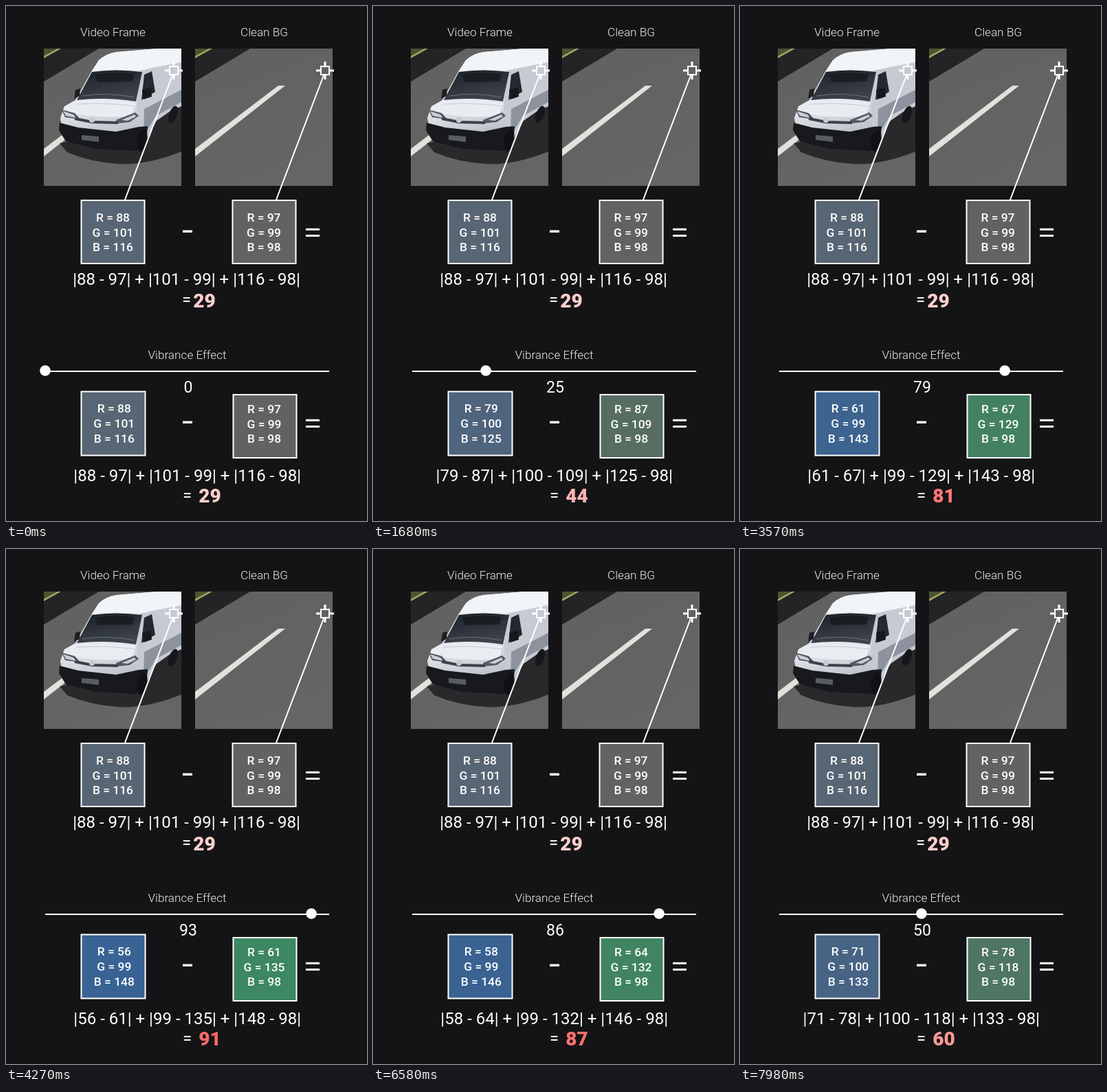
An HTML page that plays this animation: 525 px wide and 750 px high, repeating every 8 s.

```html
<!DOCTYPE html>
<html lang="en">
<head>
<meta charset="utf-8">
<title>Vibrance Effect</title>
<style>
  html, body { margin: 0; width: 100%; height: 100%; overflow: hidden; background: #141416; }
  svg { display: block; width: 525px; height: 750px; }
  text { font-family: Roboto, "Open Sans", sans-serif; fill: #fff; text-anchor: middle; white-space: pre; }
  .title { font-size: 17.2px; font-weight: 300; fill: #eee; }
  .rgb { font-size: 17.4px; font-weight: 500; }
  .sum { font-size: 24px; }
  .value { font-size: 23px; }
  .total { font-size: 28px; font-weight: 800; fill: #ffcfcb; }
  .ink { stroke: #fff; stroke-width: 2; fill: none; }
  .box { stroke: #fff; stroke-width: 2; }
</style>
</head>
<body>
<svg viewBox="0 0 525 750">
  <defs>
    <clipPath id="photo"><rect width="200" height="200"/></clipPath>
    <linearGradient id="asphalt" x2=".4" y2="1">
      <stop offset="0" stop-color="#626161"/><stop offset="1" stop-color="#666565"/>
    </linearGradient>
    <linearGradient id="paint" x2=".3" y2="1">
      <stop offset="0" stop-color="#f5f7fa"/><stop offset=".6" stop-color="#e4e8ed"/><stop offset="1" stop-color="#b5bbc4"/>
    </linearGradient>
    <linearGradient id="glass" x2=".4" y2="1">
      <stop offset="0" stop-color="#1b2027"/><stop offset="1" stop-color="#3d434b"/>
    </linearGradient>
    <g id="road">
      <rect width="200" height="200" fill="url(#asphalt)"/>
      <path d="M0 0H80L0 48Z" fill="#232425"/>
      <path d="M0 0H23L0 13Z" fill="#4c5430"/>
      <path d="M0 11 20 0H25L0 14Z" fill="#aaa467"/>
      <path d="M0 146 121 54H131L0 157Z" fill="#e2e1dc"/>
    </g>
    <g id="target" class="ink">
      <rect x="-6" y="-6" width="12" height="12"/>
      <path d="M-13 0H-6M6 0H13M0-13V-6M0 6V13" stroke-width="3"/>
      <path d="M-2 7-71 188"/>
    </g>
  </defs>
  <rect width="525" height="750" fill="#141416"/>

  <g transform="translate(55 62)" clip-path="url(#photo)">
    <use href="#road"/>
    <!-- shadow and underside -->
    <path d="M23 138 34 151Q70 166 110 168T200 150V75L150 110Z" fill="#29292b"/>
    <!-- body -->
    <path d="M70 32 80 17Q91 7 106 5L165 0H200V78L187 88 165 100 150 132 134 140 28 124 24 101 30 84 46 75Z" fill="url(#paint)"/>
    <path d="M140 32 158 28 185 23 200 20V84L184 91 164 105 150 128 138 120 135 84Z" fill="#c6cbd3"/>
    <path d="M146 88 200 60V78L163 98 145 128Z" fill="#8d939e"/>
    <path d="M80 17Q91 7 106 5L165 0H200V18L145 31 72 30Z" fill="#f2f5f8"/>
    <!-- glass -->
    <path d="M70 34Q105 29 143 34L134 77Q90 70 48 75Z" fill="url(#glass)"/>
    <path d="M75 38Q104 33 132 37L129 48 78 49Z" fill="#14181d" opacity=".75"/>
    <path d="M56 69Q91 63 132 71" stroke="#6a7178" fill="none"/>
    <path d="M146 38 157 33 162 63 142 75Z" fill="#24292f"/>
    <path d="M143 60 156 57 157 70 145 74Z" fill="#16191c"/>
    <path d="M46 60 53 58 52 69 44 73Z" fill="#1c2024"/>
    <!-- bonnet -->
    <path d="M47 77Q91 72 134 79L128 98Q80 103 27 92L31 84Z" fill="#e9edf1"/>
    <path d="M47 81Q91 78 133 84" stroke="#c3cad2" fill="none"/>
    <!-- bumper, grille, lights -->
    <path d="M23 108 50 115 105 121 138 114 151 113 149 139 134 149 75 146 32 135 22 119Z" fill="#17191d"/>
    <path d="M26 89 45 94 53 103 31 100Z" fill="#4d545e"/>
    <path d="M28 91 43 96 47 101 32 98Z" fill="#c6ced7"/>
    <path d="M105 104 133 93 138 98 125 107 106 109Z" fill="#535a64"/>
    <path d="M113 104 132 96 134 99 122 105Z" fill="#c7ced7"/>
    <path d="M45 102 70 107 108 108" stroke="#3c4148" stroke-width="4" fill="none"/>
    <circle cx="70" cy="104" r="4" fill="#c5cbd2"/>
    <path d="M55 126 80 128V136L55 133Z" fill="#595d62"/>
    <!-- wheels -->
    <ellipse cx="143" cy="134" rx="7" ry="16" transform="rotate(12 143 134)" fill="#101114"/>
    <ellipse cx="188" cy="96" rx="6" ry="13" transform="rotate(20 188 96)" fill="#15171a"/>
  </g>
  <use href="#road" transform="translate(275 62)" clip-path="url(#photo)"/>
  <g id="stage"></g>
</svg>
<script>
const STEP = 70, LOOP = 8000;
const stage = document.getElementById('stage');

function add(tag, attrs, text = '') {
  const el = document.createElementNS('http://www.w3.org/2000/svg', tag);
  for (const key in attrs) el.setAttribute(key, attrs[key]);
  el.textContent = text;
  return stage.appendChild(el);
}
const label = (cls, x, y, text) => add('text', { class: cls, x, y }, text);
const rgb = c => `rgb(${c.join(',')})`;
const mix = (a, b, p) => a.map((v, i) => Math.round(v + (b[i] - v) * p));

// Bordered swatch with three channel lines
function swatch(x, y, textX, textY, size = 92) {
  const box = add('rect', { class: 'box', x, y, width: size, height: size });
  const lines = [0, 1, 2].map(i => label('rgb', textX, textY + i * 21.7));
  return color => {
    box.setAttribute('fill', rgb(color));
    lines.forEach((line, i) => line.textContent = `${'RGB'[i]} = ${color[i]}`);
  };
}

// Sum of absolute channel differences
function difference(x, y, totalX, totalY) {
  const sum = label('sum', x, y);
  const total = label('total', totalX, totalY);
  return (a, b, color) => {
    sum.textContent = a.map((v, i) => `|${v} - ${b[i]}|`).join(' + ');
    total.textContent = a.reduce((s, v, i) => s + Math.abs(v - b[i]), 0);
    total.style.fill = rgb(color);
  };
}

function operators(y) {
  add('rect', { x: 257, y: y - 1.5, width: 14, height: 3.4, fill: '#fff' });
  for (const dy of [-4.2, 5])
    add('rect', { x: 436, y: y + dy, width: 20, height: 3, fill: '#fff' });
}

const PALE = [255, 207, 203], RED = [255, 98, 98];
const FRAME = [88, 101, 116], CLEAN = [97, 99, 98];

label('title', 155.5, 44, 'Video Frame');
label('title', 375.5, 44, 'Clean BG');
label('title', 263.5, 514, 'Vibrance Effect');
for (const x of [244, 464]) add('use', { href: '#target', x, y: 94 });

swatch(109.5, 283, 155.5, 313.8)(FRAME);
swatch(329.5, 283, 375, 313.8)(CLEAN);
operators(328);
difference(262.5, 406, 288.5, 439)(FRAME, CLEAN, PALE);
label('sum', 262.5, 436, '=');

add('path', { class: 'ink', d: 'M57 532H470' });
const knob = add('circle', { cy: 531, r: 7.8, fill: '#fff' });
const value = label('value', 265, 563);
const left = swatch(109.5, 561.5, 157.3, 592.3, 93);
const right = swatch(330.5, 566, 375.5, 592.8);
operators(606);
const result = difference(263.7, 691.5, 296.5, 723);
label('sum', 263.7, 721, '=');

const ease = t => t * t * (3 - 2 * t);

// Rise over 72 steps, rest, then ease back
function level(n) {
  if (n < 72) return ease(n / 72);
  if (n < 79) return 1;
  return 1 - ease((n - 77.4) / 73.3);
}

function draw(ms) {
  const p = level(Math.floor(ms / STEP));
  const a = mix([88.4, 101, 115.6], [53.4, 99, 150.6], p);
  const b = mix(CLEAN, [59, 137, 98], p);
  knob.setAttribute('cx', 57 + 413 * p);
  value.textContent = Math.floor(p * 100);
  left(a);
  right(b);
  result(a, b, mix(PALE, RED, p));
}

const start = performance.now();
function tick(now) {
  draw(Math.max(0, now - start) % LOOP);
  requestAnimationFrame(tick);
}
draw(0);
requestAnimationFrame(tick);
</script>
</body>
</html>
```
